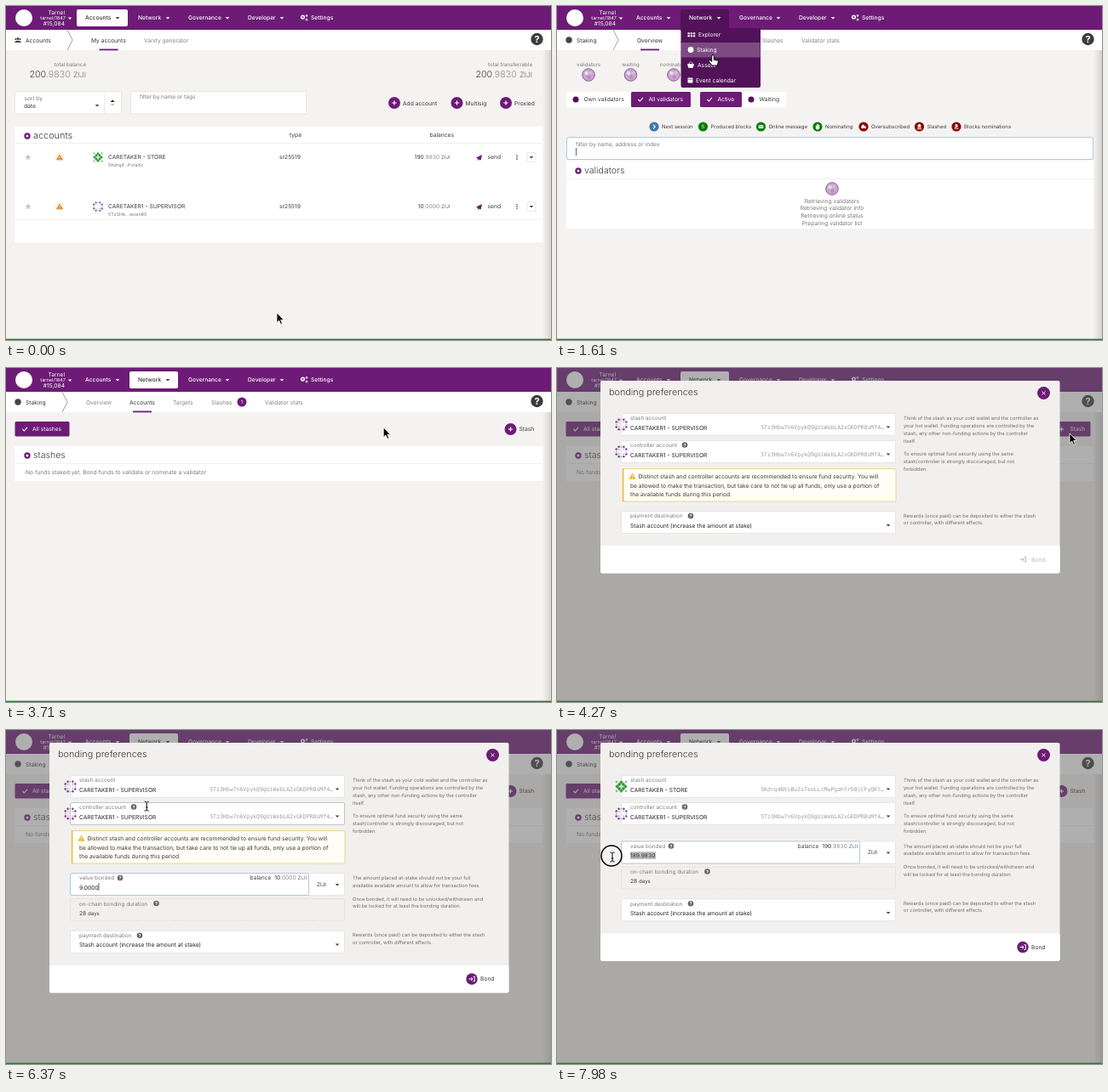
An HTML page that plays this animation: 640 by 393 pixels, repeating every 8 s.

```html
<!DOCTYPE html>
<html lang="en">
<head>
<meta charset="utf-8">
<title>Bonding preferences</title>
<style>
  html, body { margin: 0; width: 100%; height: 100%; overflow: hidden; background: #f5f3f2; }
  svg { display: block; width: 100%; height: 100%; font-family: Inter, "Open Sans", sans-serif; text-rendering: geometricPrecision; }
  .mono { font-family: "DejaVu Sans Mono", "Noto Sans Mono", monospace; }
</style>
</head>
<body>
<svg id="stage" viewBox="0 0 640 393" preserveAspectRatio="none"></svg>
<script>
const LOOP = 8000;
const PURPLE = '#6d1b76', DARK = '#521259', INK = '#3a3a3a', GREY = '#7d7b7a', LINE = '#e4e1df';
const BLUE = '#4078a8', GREEN = '#0b7d0b', RED = '#8b0808', FOCUS = '#9dbfdc';
const TOKEN = 'ZIJI';
const STORE = { name: 'CARETAKER - STORE', short: '5Kdrq4...PvtaXc', long: '5Kdrq4NVsBu2xTeeLLcMwPgahYrD8jCFyQKt…', gem: true };
const SUPER = { name: 'CARETAKER1 - SUPERVISOR', short: '5Tz3Hb...woenRS', long: '5Tz3Hbw7n6VpykQ9gUiWebLA2xGKDPR8sMf4…', gem: false };

// Drawing helpers
const text = (x, y, s, o = {}) =>
  `<text x="${x}" y="${y}" font-size="${o.size || 6.7}" fill="${o.fill || INK}" text-anchor="${o.anchor || 'start'}" font-weight="${o.weight || 400}" class="${o.cls || ''}">${s}</text>`;
const end = (x, y, s, o) => text(x, y, s, { anchor: 'end', ...o });
const mid = (x, y, s, o) => text(x, y, s, { anchor: 'middle', ...o });
const lines = (x, y, step, rows, o) => rows.map((s, i) => text(x, y + i * step, s, o)).join('');
const rect = (x, y, w, h, fill, more = '') => `<rect x="${x}" y="${y}" width="${w}" height="${h}" fill="${fill}" ${more}/>`;
const disc = (x, y, r, fill, more = '') => `<circle cx="${x}" cy="${y}" r="${r}" fill="${fill}" ${more}/>`;
const path = (d, fill = 'none', more = '') => `<path d="${d}" fill="${fill}" ${more}/>`;
const stroke = (c, w = 1) => `stroke="${c}" stroke-width="${w}"`;
const group = (id, body) => `<g id="${id}">${body}</g>`;
const hline = y => rect(11, y, 619, .7, '#eceae9');
const caret = (x, y, fill = '#444') => path(`M${x - 2.3} ${y - 1.1}h4.6l-2.3 2.5z`, fill);
const box = (x, y, w, h, line = LINE) => rect(x + .5, y + .5, w - 1, h - 1, '#fff', `rx="1.5" ${stroke(line, .8)}`);
const amount = (whole, part, size) =>
  `<tspan fill="${INK}">${whole}</tspan><tspan fill="#908e8d">${part} </tspan><tspan fill="#666" font-size="${size}">${TOKEN}</tspan>`;

const help = (x, y) => disc(x, y, 3.3, '#666') + mid(x, y + 2, '?', { size: 5.4, fill: '#fff', weight: 700 });
const plus = (x, y) => disc(x, y, 7, PURPLE) + path(`M${x - 2.6} ${y}h5.2M${x} ${y - 2.6}v5.2`, 'none', stroke('#fff', 1.2));
const bullet = (x, y) => disc(x, y, 2.6, '#fff', stroke(PURPLE, 2.2));
const warnSign = (x, y, c) => path(`M${x} ${y - 3}l3.4 5.8h-6.8z`, c, `${stroke(c, .8)} stroke-linejoin="round"`) +
  path(`M${x} ${y - 1.3}v2.2m0 .8v.8`, 'none', stroke('#fff', .8));
const check = (x, y) => path(`M${x - 2.6} ${y}l2 2 3.6-4.2`, 'none', stroke('#fff', 1.1));
const star = (x, y) => {
  const pts = Array.from({ length: 10 }, (_, i) => {
    const a = i * Math.PI / 5, r = i % 2 ? 1.7 : 4;
    return `${(x + r * Math.sin(a)).toFixed(2)},${(y - r * Math.cos(a)).toFixed(2)}`;
  });
  return `<polygon points="${pts.join(' ')}" fill="#c9c7c6"/>`;
};
const ball = (x, y) => disc(x, y, 7.3, '#c9a9cd', stroke('#8a4d92', .9)) +
  disc(x - 2.4, y - 2, 2.2, '#ead9ec') + disc(x + 2.4, y - 2.4, 1.6, '#dcc3df') + disc(x + .6, y + 2.8, 2.4, '#b88fbd');

function identicon(x, y, s, gem, color = '#7b3d99') {
  const c = s / (gem ? 4.2 : 5);
  let out = '';
  if (gem) {
    for (let i = -1; i <= 1; i++) for (let j = -1; j <= 1; j++)
      out += rect((i - .46) * c, (j - .46) * c, c * .92, c * .92, i || j ? '#2d9b3c' : '#bfe5bf');
    out = `<g transform="translate(${x} ${y}) rotate(45)">${out}</g>`;
    for (const i of [-1, 1]) for (const j of [-1, 1]) out += disc(x + i * s * .38, y + j * s * .38, s * .09, '#7cc57f');
    return out;
  }
  for (let i = -2; i <= 2; i++) for (let j = -2; j <= 2; j++) {
    const d = Math.abs(i) + Math.abs(j);
    if (d > 1 && d < 4) out += disc(x + i * c, y + j * c, c * (d === 3 ? .43 : .3), d === 2 ? '#bd99ca' : color);
  }
  return out;
}

// Page chrome
const MENUS = [['Accounts', 93, 131], ['Network', 155, 190], ['Governance', 214, 260], ['Developer', 284, 324]];
function header(active) {
  let out = rect(0, 0, 640, 28, PURPLE) + disc(21, 14, 10, '#fff');
  out += end(69, 9.6, 'Tarnel', { fill: '#fff', size: 6.6 }) + end(70, 16.2, 'tarnel/1847', { fill: '#fff', size: 5.6 }) +
    end(69, 23.4, '#15,084', { fill: '#fff', size: 6.7 }) + caret(75, 14.5, '#fff');
  for (const [s, x, cx] of MENUS) {
    const on = s === active;
    if (on) out += rect(x - 10, 4, cx - x + 22, 20, '#fff', 'rx="2"');
    out += text(x, 16.4, s, { fill: on ? '#333' : '#fff', weight: 500 }) + caret(cx, 14, on ? '#333' : '#fff');
  }
  out += disc(348.5, 13, 1.8, 'none', stroke('#fff', 1.5)) + disc(353, 11.4, 1, 'none', stroke('#fff', .9)) + disc(353, 16, 1, 'none', stroke('#fff', .9));
  return out + text(358, 16.4, 'Settings', { fill: '#fff', weight: 500 });
}
function tabBar(title, x, tabs, current) {
  let out = rect(0, 28, 640, 24, '#fff') + text(23, 42.5, title, { fill: '#333' });
  out += path(`M${x} 28l6 12-6 12`, 'none', stroke('#777', .7));
  for (const [s, tx, w] of tabs) {
    const on = s === current;
    out += text(tx, 42.5, s, { fill: on ? '#333' : '#858382' });
    if (on) out += rect(tx + w / 2 - 11, 50.5, 22, 1.8, PURPLE);
  }
  return out + disc(623.5, 39, 7.2, '#3c3c3c') + mid(623.5, 43, '?', { size: 11, fill: '#fff', weight: 700 });
}
const stakingBar = (current, loaded) =>
  tabBar('Staking', 66, [['Overview', 94, 30], ['Accounts', 145, 30], ['Targets', 196, 24], ['Slashes', 241, 25], ['Validator stats', loaded ? 304 : 287, 46]], current) +
  disc(14, 40, 3.7, '#444') +
  (loaded ? disc(277, 40, 5.5, PURPLE) + mid(277, 42, '1', { size: 5.6, fill: '#fff' }) : '');

// Accounts page
function accountRow(y, who, whole, part) {
  return star(26, y) + disc(63, y, 5.6, '#f6f2ec') + warnSign(63, y, '#e08a1e') + identicon(108, y, 12, who.gem) +
    text(120, y + 2.4, who.name) + text(120, y + 10.6, who.short, { size: 5.4, fill: '#777' }) +
    text(321, y + 2.4, 'sr25519') + end(521.5, y + 2.4, amount(whole, part, 6)) +
    path(`M552 ${y + .6}l7-3.6-1.4 6.6-2.2-1-1.2 1.6-.2-2.4z`, PURPLE) + text(565.5, y + 2.4, 'send') +
    [-2.2, 0, 2.2].map(d => disc(600, y + d, .75, '#333')).join('') +
    box(611.5, y - 6, 11, 12) + caret(617, y);
}
function accountsPage() {
  let out = header('Accounts') + tabBar('Accounts', 72, [['My accounts', 100, 41], ['Vanity generator', 162, 53]], 'My accounts');
  out += disc(14, 38.6, 1.5, '#444') + disc(11.4, 39, 1.1, '#444') + disc(16.6, 39, 1.1, '#444') + path('M10 43q1.6-3 4-2 2.4-1 4 2z', '#444');
  for (const [x, s] of [[94, 'total balance'], [618, 'total transferrable']])
    out += end(x, 70.5, s, { size: 6.2, fill: GREY }) + end(x, 84, amount(200, '.9830', 8.8), { size: 10.7, weight: 300 });
  out += box(10, 100, 126, 27.5) + rect(115.5, 100.5, .7, 26.5, LINE) + text(21.5, 110.6, 'sort by', { size: 6.5, fill: GREY }) + text(21, 120, 'date') + caret(107, 117);
  out += path('M122.6 113h5l-2.5-2.7z', '#222') + path('M122.6 115h5l-2.5 2.6z', '#bbb');
  out += box(146, 100, 207, 27.5) + text(157, 109.3, 'filter by name or tags', { size: 6.5, fill: GREY });
  for (const [x, s] of [[456, 'Add account'], [529.5, 'Multisig'], [587, 'Proxied']]) out += plus(x, 114) + text(x + 10, 116.5, s);
  out += rect(10.5, 142, 620, 136, '#fff') + bullet(25, 153) + text(32, 156.3, 'accounts', { size: 10.9, weight: 300 });
  out += mid(340, 154.3, 'type') + end(526, 154.3, 'balances') + hline(161) + hline(251);
  return out + accountRow(178, STORE, 190, '.9830') + accountRow(236, SUPER, 10, '.0000');
}

// Staking pages
function toggles(y) {
  const item = (x, w, s, on) => rect(x, y, w, 18, on ? PURPLE : '#fff', 'rx="1.5"') +
    (on ? check(x + 11, y + 9) : disc(x + 11, y + 9, 3.5, DARK)) + text(x + 20.5, y + 11.4, s, { fill: on ? '#fff' : INK });
  return item(11, 76, 'Own validators') + item(87, 70, 'All validators', true) + item(168, 49, 'Active', true) + item(217, 52, 'Waiting');
}
function badge(x, y, color, sign = '') {
  const white = (d, w = 1) => path(d, 'none', stroke('#fff', w));
  const marks = {
    next: () => white(`M${x - 1} ${y - 2.3}l2.3 2.3-2.3 2.3`, 1.1),
    mail: () => rect(x - 2.8, y - 2, 5.6, 4, '#fff') + path(`M${x - 2.8} ${y - 1.6}l2.8 2 2.8-2`, 'none', stroke(color, .7)),
    hand: () => white(`M${x - 1.7} ${y - 1.5}v3m1.2-4.5v4m1.2-4v4m1.2-3v3`, .9) + disc(x, y + 1.4, 2.1, '#fff'),
    chart: () => rect(x - 2.7, y - .6, 5.4, 2.5, '#fff') + disc(x - .6, y - 1, 1.6, '#fff'),
    skull: () => disc(x, y - 1, 2, '#fff') + white(`M${x - 2.5} ${y + 1.3}l5 2m0-2l-5 2`, .8),
    user: () => disc(x, y - 1.5, 1.4, '#fff') + white(`M${x - 2.5} ${y + 2.2}h5M${x - 2} ${y + .8}l4-1`, .9),
    link: () => white(`M${x - 2} ${y + .9}q-.3-2 2-1.7m0 1.4q2.5.2 2-1.6M${x - 1.3} ${y + 1.6}l2.6-3.2`, .9)
  };
  const r = sign === 'link' ? 4.4 : 5.6;
  return disc(x, y, r, color) + (marks[sign] ? marks[sign]() : mid(x, y + 2, sign, { size: 5.8, fill: '#fff' }));
}
const LEGEND = [[114, BLUE, 'next', 'Next session'], [171.5, GREEN, '5', 'Produced blocks'], [239.5, GREEN, 'mail', 'Online message'],
  [306, GREEN, 'hand', 'Nominating'], [360, RED, 'chart', 'Oversubscribed'], [425.5, RED, 'skull', 'Slashed'], [469, RED, 'user', 'Blocks nominations']];
const legend = y => LEGEND.map(([x, c, sign, s]) => badge(x, y, c, sign) + text(x + 9, y + 2.2, s, { size: 6 })).join('');
const filterBox = y => box(11, y, 619, 27, FOCUS) + text(22, y + 11, 'filter by name, address or index', { size: 6.6, fill: GREY }) + rect(22, y + 13, .7, 9, '#222');
const tableTitle = (y, s) => bullet(25, y) + text(32, y + 3.3, s, { size: 10.6, weight: 300 });
const label = (x, s, y = 75.2) => end(x, y, s, { size: 6.1, fill: GREY });
const big = (x, s, y) => end(x, y, s, { size: 10.7, weight: 300 });

function loadingPage() {
  let out = header('') + stakingBar('Overview', false);
  for (const [x, s] of [[37, 'validators'], [86.5, 'waiting'], [137, 'nominators']]) out += mid(x, 70.5, s, { size: 6.1, fill: GREY }) + ball(x, 81);
  out += toggles(101) + legend(142) + filterBox(154) + rect(11, 182, 619, 80, '#fff') + tableTitle(194, 'validators') + hline(203) + ball(323, 215);
  return out + lines(323, 231.5, 8.7, ['Retrieving validators', 'Retrieving validator info', 'Retrieving online status', 'Preparing validator list'], { anchor: 'middle', fill: '#777' });
}
function ring(x, y, part, s) {
  const r = 12.6, len = 2 * Math.PI * r;
  return disc(x, y, r, 'none', stroke('#dccfe0', 2.4)) +
    disc(x, y, r, 'none', `${stroke(PURPLE, 2.4)} stroke-dasharray="${len * part} ${len}" transform="rotate(-90 ${x} ${y})"`) + mid(x, y + 2.4, s, { size: 6.9 });
}
function validatorRow(i, [name, sub, blocks, other, own, fee, points, last, color]) {
  const y = 265 + i * 20.5, t = y + 2.4;
  const split = v => { const k = v.indexOf('.'); return amount(v.slice(0, k), v.slice(k), 6); };
  return star(26, y) + badge(56, y, BLUE, 'next') + (blocks ? badge(69.5, y, GREEN, blocks) : '') + identicon(95.5, y, 11, false, color) + badge(112, y, GREEN, 'link') +
    text(119, t, `${name}<tspan font-size="5.3" fill="#777">/${sub}</tspan>`) +
    (other ? end(390.5, t, split(other) + ' <tspan>(1)</tspan>') + caret(398, y) : '') + end(468, t, split(own)) +
    end(520, t, fee) + end(554, t, points) + end(590, t, last) +
    path(`M604 ${y - 3}v6h7m-5.5-2l1.8-2 1.3 1.2 2.2-2.5`, 'none', stroke(PURPLE, 1)) + hline(y + 10);
}
function overviewPage() {
  let out = header('Network') + stakingBar('Overview', true);
  for (const [x, s, v] of [[51, 'validators', '4 / 17'], [97, 'waiting', '0'], [178, 'active / nominators', '1 / 1'], [309, 'inflation', '2.5%']]) out += label(x, s) + big(x, v, 90);
  for (const [x, s, v, more] of [[469, 'epoch', '4 hrs', '1 hr 35 mins'], [585, 'era', '1 day', '+1 day 18 hrs']]) out += label(x, s, 72) + big(x, v, 86.3) + end(x, 94.2, more, { size: 5.6, fill: '#555' });
  out += ring(489, 82, .6, '60%') + ring(603.5, 82, .76, '276%');
  out += rect(58.5, 108.5, 524, 29, '#fffbec', `rx="1.5" ${stroke('#ead489', .8)}`) + rect(58, 108, 2, 30, '#e5bd35') + warnSign(70, 118, '#e5b92c');
  out += text(77, 120.7, 'Use the account actions to create a new validator/nominator stash and bond it to participate in staking. Do not send funds directly via a transfer to a') + text(66, 131, 'validator.');
  out += toggles(152) + legend(193) + filterBox(205) + rect(11, 233, 619, 103, '#fff') + tableTitle(245, 'validators') + hline(254.5);
  for (const [x, s] of [[400, 'other stake'], [468, 'own stake'], [520, 'commission'], [554, 'points'], [590, 'last #']]) out += end(x, 246.5, s, { fill: '#555' });
  const rows = [
    ['BASTORIN', '2', '', '', '498.9999', '0.00%', '', '', '#c0508d'],
    ['TOMVEK', 'CARETAKER_1', '3', '', '23,166.8863', '1.00%', '940', '', '#3f9b57'],
    ['TOMVEK', 'CARETAKER_3', '7', '290.7270', '22,699.7453', '1.00%', '1,200', '15,084', '#3b78a8'],
    ['TOMVEK', 'CARETAKER_2', '4', '109.2729', '22,881.2127', '1.00%', '5,640', '', '#6b2fa0']
  ];
  return out + rows.map((r, i) => validatorRow(i, r)).join('') + rect(149, 50.5, 22, 1.8, '#c4c1c3', 'id="tabHover"');
}
function stashPage() {
  let out = header('Network') + stakingBar('Accounts', true);
  out += rect(10.5, 63, 64, 17.5, PURPLE, 'rx="1.5"') + check(22, 72) + text(31, 74.4, 'All stashes', { fill: '#fff' });
  out += rect(583, 63, 43.5, 17.5, PURPLE, 'id="addHover" rx="1.5"') + plus(592.5, 72) + text(602.5, 74.4, `<tspan id="addText">Stash</tspan>`);
  return out + rect(10.5, 92, 620, 41, '#fff') + tableTitle(103, 'stashes') + hline(112) + text(23, 125, 'No funds staked yet. Bond funds to validate or nominate a validator', { fill: GREY });
}

function networkMenu() {
  const white = { fill: '#fff' };
  let out = rect(145, 4, 57, 26, DARK, 'rx="2"') + rect(145.5, 26, 93.5, 70, DARK, 'rx="2"') + rect(146, 43, 92.5, 17.5, 'rgba(255,255,255,.24)', 'id="pick"');
  out += text(155, 16.4, 'Network', { fill: '#fff', weight: 500 }) + caret(190, 14, '#fff');
  for (let i = 0; i < 6; i++) out += rect(153.5 + i % 3 * 3.2, 31.3 + (i / 3 | 0) * 3, 2.3, 2, '#fff');
  out += text(166, 36, 'Explorer', white) + disc(157, 51.5, 3.4, '#fff') + text(164, 54, 'Staking', white);
  out += path('M153.5 68.5h7l-1 4h-5zM155 68l1.5-2.5m2.7 2.5l-1.5-2.5', '#fff', stroke('#fff', .7)) + text(165, 72, 'Assets', white);
  return out + rect(153.5, 84.5, 6, 6, '#fff', 'rx=".7"') + path('M153.5 86.3h6', 'none', stroke(DARK, .6)) + text(163, 89.8, 'Event calendar', white);
}

// Bonding dialog
const field = (y, name, value, o = {}) => box(75, y, o.w || 323, 27, o.line) + text(86, y + 8.4, name, { size: 6.4, fill: GREY }) + text(86, y + 19.5, value, { fill: '#222' });
const account = (y, name, who, line) => field(y, name, who.name, { line }) + identicon(75.5, y + 13.5, 14.5, who.gem) +
  end(384, y + 18.8, who.long, { size: 6.5, fill: '#a09e9d', cls: 'mono' }) + caret(389, y + 16.5);
const note = (y, rows, step = 8.9) => lines(407, y, step, rows, { size: 5.75, fill: '#6f6d6c' });

function dialog({ who, value, whole, part, ready = true, warn, hover }) {
  const y = warn ? 168 : 130.5, pay = y + (value ? 67.7 : 0), foot = pay + 41;
  let out = rect(51, 15, 539.5, foot - 15 + 32.5, '#f2f0ee', 'rx="2"') + rect(51, foot, 539.5, 32.5, '#fff', 'rx="2"');
  out += text(61, 32, 'bonding preferences', { size: 10.8, weight: 300 }) + disc(571.5, 29.5, 7.5, PURPLE) + path('M569.6 27.6l3.8 3.8m0-3.8l-3.8 3.8', 'none', stroke('#fff', 1));
  out += account(53, 'stash account', who) + account(85, 'controller account', SUPER, hover ? '#bab7b6' : LINE) + help(150, 90.5);
  out += note(61, ['Think of the stash as your cold wallet and the controller as', 'your hot wallet. Funding operations are controlled by the', 'stash, any other non-funding actions by the controller', 'itself.']);
  out += note(103, ['To ensure optimal fund security using the same', 'stash/controller is strongly discouraged, but not', 'forbidden.']);
  if (warn) {
    out += rect(77.5, 118.5, 320.5, 38.5, '#fffdf5', `rx="1.5" ${stroke('#ecd17a', .9)}`) + rect(76.8, 118.2, 1.6, 39, '#e8be3a') + warnSign(88.5, 127.5, '#e5b92c');
    out += text(95.5, 130, 'Distinct stash and controller accounts are recommended to ensure fund security. You will');
    out += lines(86, 140.5, 10.5, ['be allowed to make the transaction, but take care to not tie up all funds, only use a portion of', 'the available funds during this period.']);
  }
  if (value) {
    out += box(75, y, 323, 27) + field(y, 'value bonded', value, { w: 281, line: FOCUS }) + help(134, y + 6);
    out += end(353, y + 8.4, `balance&#160; ${amount(whole, part, 6)}`, { fill: '#444' }) + text(365, y + 15.6, TOKEN, { size: 6.3 }) + caret(389, y + 14);
    out += rect(75.5, y + 30.5, 322, 26, 'none', `rx="1.5" stroke-dasharray="1.5 1.5" ${stroke('#d5d2d0', .8)}`) + text(86, y + 38.5, 'on-chain bonding duration', { size: 6.4, fill: GREY }) + help(176.5, y + 36);
    out += text(86, y + 49.6, '28 <tspan font-size="6.1">days</tspan>');
    out += note(y + 8, ['The amount placed at-stake should not be your full', 'available available amount to allow for transaction fees.']) + note(y + 32.5, ['Once bonded, it will need to be unlocked/withdrawn and', 'will be locked for at least the bonding duration.']);
  }
  out += field(pay, 'payment destination', 'Stash account (increase the amount at stake)') + help(157, pay + 6) + caret(389, pay + 17);
  out += note(pay + 7.6, ['Rewards (once paid) can be deposited to either the stash', 'or controller, with different effects.'], 8.2);
  const cy = foot + 16.3, ink = ready ? '#fff' : '#b9b7b6';
  if (ready) out += disc(547, cy, 6.7, PURPLE);
  out += path(`M543.5 ${cy}h4.5m-1.8-1.9l1.9 1.9-1.9 1.9M548.5 ${cy - 2.8}h1.8v5.6h-1.8`, 'none', stroke(ink, 1));
  return out + text(557, cy + 2.4, 'Bond', { fill: ready ? INK : '#b9b7b6' });
}

const ARROW = path('M0 0v11.5l2.7-2.4 1.9 4.3 1.9-.8-1.9-4.2h3.6z', '#000', stroke('#fff', .8));
const HAND = path('M-1.3 1q0-1.5 1.3-1.5t1.3 1.5v3.7l4 .9q1.3.5 1 2l-.9 4.4h-6.4l-3.4-4.7q-.6-1.2.6-1.6 1 0 2.5 1.7z', '#fff', stroke('#000', .9) + ' stroke-linejoin="round"') +
  path('M1.4 4.7v2m1.7-1.5v1.7m1.6-1.3v1.6', 'none', stroke('#000', .6));
const BEAM_LINE = 'M-2.5-5.5q2 0 2.5 1.2.5-1.2 2.5-1.2M-2.5 5.5q2 0 2.5-1.2.5 1.2 2.5 1.2M0-4.5v9M-1.2 1.5h2.4';
const BEAM = path(BEAM_LINE, 'none', stroke('#fff', 2)) + path(BEAM_LINE, 'none', stroke('#000', 1));

const stage = document.getElementById('stage');
stage.innerHTML =
  '<defs><linearGradient id="shade"><stop offset="0" stop-color="#000" stop-opacity="0"/><stop offset="1" stop-color="#000" stop-opacity=".13"/></linearGradient></defs>' +
  rect(0, 0, 640, 393, '#f5f3f2') +
  group('accounts', accountsPage()) + group('loading', loadingPage()) + group('overview', overviewPage()) + group('stash', stashPage()) +
  rect(630, 52, 10, 340, 'url(#shade)') + group('menu', networkMenu()) + rect(0, 0, 640, 393, 'rgba(96,96,96,.5)', 'id="dim"') +
  group('empty', dialog({ who: SUPER, warn: true, ready: false })) +
  group('same', dialog({ who: SUPER, warn: true, hover: true, value: '9.0000', whole: 10, part: '.0000' }) + rect(108.6, 180, .7, 9, '#222')) +
  group('split', dialog({ who: STORE, hover: true }) + rect(86, 65, .7, 9, '#222')) +
  group('full', dialog({ who: STORE, value: '189.9830', whole: 190, part: '.9830' }) + rect(86, 143.2, 30, 8.8, 'rgba(70,70,70,.36)', 'id="mark"')) +
  rect(0, 391.6, 640, 1.4, '#148a1c') +
  group('cursor', disc(-1, -1.5, 12, 'rgba(255,255,255,.15)', `id="ring" ${stroke('#000', 1.5)}`) + group('arrow', ARROW) + group('hand', HAND) + group('beam', BEAM));

// time, x, y, pointer shape
const TRACK = [[0, 318, 361, 'arrow'], [140, 318, 361, 'arrow'], [770, 178, 16, 'hand'], [910, 178, 18, 'hand'], [1260, 183, 58, 'hand'], [1680, 183, 58, 'hand'],
  [2030, 132, 72, 'arrow'], [2590, 165, 46, 'hand'], [2940, 165, 46, 'hand'], [3220, 178, 58, 'arrow'], [4060, 602, 77, 'arrow'], [4760, 602, 77, 'arrow'],
  [5110, 362, 94, 'beam'], [5530, 190, 103, 'beam'], [5740, 190, 103, 'beam'], [6090, 176, 69, 'beam'], [6440, 164, 92, 'arrow'], [6790, 167, 115, 'arrow'],
  [6930, 167, 115, 'arrow'], [7420, 118, 149, 'beam'], [7560, 118, 149, 'beam'], [7910, 65, 149.5, 'beam'], [LOOP, 65, 149.5, 'beam']];
const PAGES = [[0, 'accounts'], [1400, 'loading'], [1820, 'overview'], [2940, 'stash']];
const DIALOGS = [[0, ''], [4270, 'empty'], [4480, 'same'], [6580, 'split'], [7070, 'full']];

const $ = id => document.getElementById(id);
const show = (id, on) => { $(id).style.display = on ? '' : 'none'; };
const at = (steps, t) => steps.filter(s => s[0] <= t).pop()[1];
const pickOne = (steps, name) => steps.forEach(([, id]) => id && show(id, id === name));

function pointer(t) {
  const i = Math.max(0, TRACK.findIndex(k => k[0] > t) - 1);
  const [t0, x0, y0, shape] = TRACK[i], [t1, x1, y1] = TRACK[i + 1];
  const p = (t - t0) / (t1 - t0), e = p * p * (3 - 2 * p);
  return { x: x0 + (x1 - x0) * e, y: y0 + (y1 - y0) * e, shape };
}
function draw(t) {
  const modal = at(DIALOGS, t);
  pickOne(PAGES, at(PAGES, t));
  pickOne(DIALOGS, modal);
  show('dim', modal);
  show('menu', t >= 770 && t < 2030);
  show('pick', t >= 1120 && t < 1820);
  show('tabHover', t >= 2520);
  const { x, y, shape } = pointer(t);
  const onAdd = x > 583 && modal !== 'same';
  show('addHover', onAdd);
  $('addText').setAttribute('fill', onAdd ? '#fff' : INK);
  $('cursor').setAttribute('transform', `translate(${x.toFixed(2)} ${y.toFixed(2)})`);
  for (const id of ['arrow', 'hand', 'beam']) show(id, id === shape);
  const dragging = t >= 7560, left = Math.min(116, Math.max(86, x));
  show('ring', dragging);
  show('mark', dragging);
  $('mark').setAttribute('x', left);
  $('mark').setAttribute('width', 116 - left);
}
const start = performance.now();
function tick() {
  draw((performance.now() - start) % LOOP);
  requestAnimationFrame(tick);
}
draw(0);
requestAnimationFrame(tick);
</script>
</body>
</html>
```
